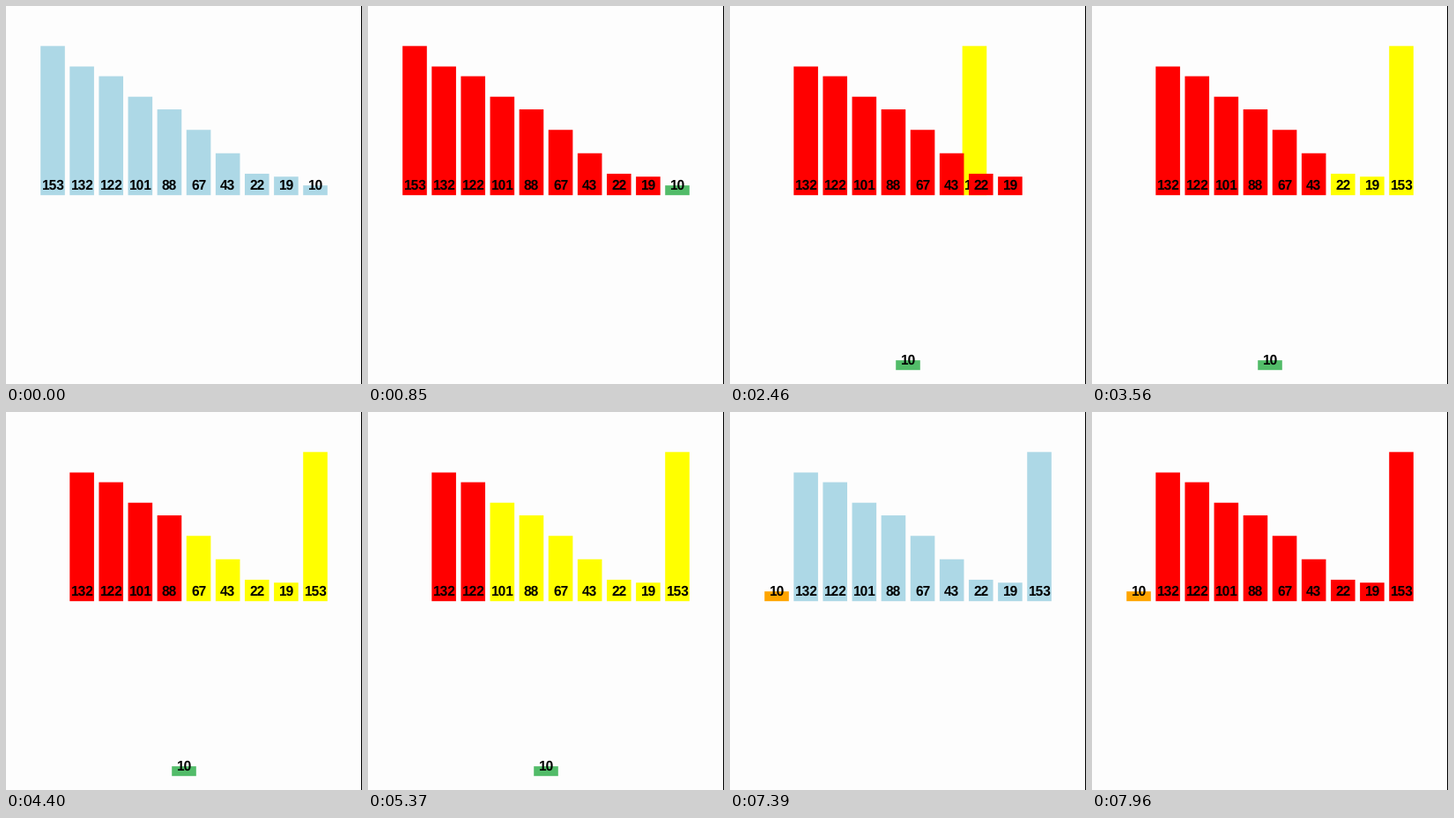
A matplotlib script that plays this animation: 404x428 px, repeating every 8 s.

```python
import numpy as np
import matplotlib.pyplot as plt
from matplotlib.animation import FuncAnimation
from matplotlib.colors import to_rgb
from matplotlib.patches import Rectangle

W, H, DPI = 404, 428, 100
LOOP, STEP = 8000, 20

VALUES = [153, 132, 122, 101, 88, 67, 43, 22, 19, 10]
UNIT = 0.5519
LEFT, BASE = 39.2, 214.2
PITCH, BAR_W, SCALE = 60 * UNIT, 50 * UNIT, 2 * UNIT
LAST = len(VALUES) - 1

IDLE, RED, YELLOW = "#add8e6", "#ff0000", "#ffff00"
GREEN, ORANGE = "#52bc69", "#ffa500"

# (bars, start ms, end ms, colour); equal times make a hard change
FADES = [
    (range(LAST + 1), 330, 480, RED),
    ([LAST], 840, 840, GREEN),
    ([0], 1830, 1980, YELLOW),
    ([8], 2840, 2950, YELLOW),
    ([7], 3330, 3470, YELLOW),
    ([6], 3810, 3920, YELLOW),
    ([5], 4330, 4400, YELLOW),
    ([4], 4820, 4930, YELLOW),
    ([3], 5240, 5360, YELLOW),
    ([2], 5830, 5940, YELLOW),
    ([1], 6310, 6450, YELLOW),
    ([LAST], 6800, 7030, ORANGE),
    (range(LAST), 7380, 7380, IDLE),
    (range(LAST), 7770, 7940, RED),
]

# (bar, start ms, end ms, slot, drop in px)
MOVES = [
    (LAST, 1265, 1535, 4.5, 198),
    (0, 2310, 2558, LAST, 0),
    (LAST, 6800, 7040, 0, 0),
]


def ease(t, start, end):
    """Cubic in-out progress from 0 to 1."""
    if t >= end:
        return 1.0
    u = max(0.0, (t - start) / (end - start))
    return 4 * u**3 if u < 0.5 else 1 - 4 * (1 - u) ** 3


def state(t):
    colors = np.array([to_rgb(IDLE)] * len(VALUES))
    places = np.array([(i, 0) for i in range(len(VALUES))], float)
    for bars, start, end, color in FADES:
        if t >= start:
            for i in bars:
                colors[i] += (np.array(to_rgb(color)) - colors[i]) * ease(t, start, end)
    for i, start, end, slot, drop in MOVES:
        if t >= start:
            places[i] += (np.array([slot, drop]) - places[i]) * ease(t, start, end)
    return np.clip(colors, 0, 1), places


plt.rcParams["font.family"] = "Liberation Sans"
plt.rcParams["text.hinting"] = "none"
fig = plt.figure(figsize=(W / DPI, H / DPI), dpi=DPI, facecolor="#fdfdfd")
ax = fig.add_axes([0, 0, 1, 1])
ax.set_xlim(0, W)
ax.set_ylim(H, 0)
ax.axis("off")
ax.add_patch(Rectangle((W - 1, 0), 1, H, fc="black", lw=0))

rects, labels = [], []
for i, value in enumerate(VALUES):
    rects.append(ax.add_patch(
        Rectangle((0, 0), BAR_W, value * SCALE, lw=0, snap=False, zorder=2 * i + 2)))
    labels.append(ax.text(0, 0, str(value), ha="center", va="baseline",
                          size=15.5 * 72 / DPI, weight="bold", zorder=2 * i + 3))


def draw(frame):
    colors, places = state(frame * STEP)
    for rect, label, color, (slot, drop) in zip(rects, labels, colors, places):
        x, bottom = LEFT + slot * PITCH, BASE + drop
        rect.set_xy((x, bottom - rect.get_height()))
        rect.set_facecolor(color)
        label.set_position((x + BAR_W / 2, bottom - 6.7))
    return rects + labels


anim = FuncAnimation(fig, draw, frames=LOOP // STEP, interval=STEP,
                     repeat=True, repeat_delay=0)
plt.show()
```
